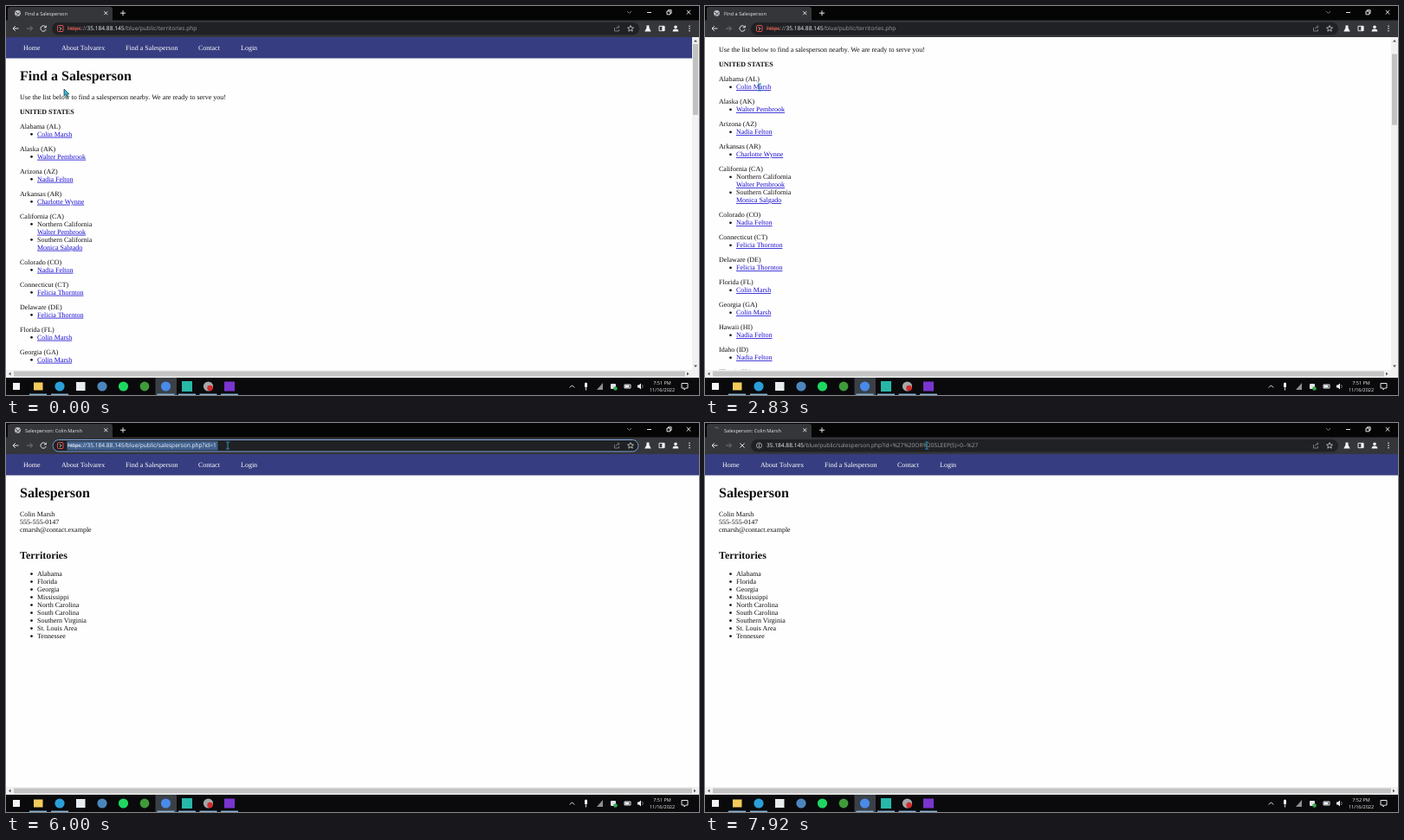
These frames come from a looping animation (800 px wide and 450 px high, 8000 ms). An HTML page:

```html
<!DOCTYPE html>
<html lang="en">
<head>
<meta charset="utf-8">
<title>Find a Salesperson</title>
<style>
  html, body { margin: 0; width: 100%; height: 100%; overflow: hidden; background: #fff; }
  svg { display: block; width: 800px; height: 450px; }
  text { font-family: "Open Sans", sans-serif; text-rendering: geometricPrecision; white-space: pre; }
  .page text { font-family: "Liberation Serif", "Times New Roman", serif; fill: #111; }
  .page .nav text { fill: #fff; }
  .page .link { fill: #1a0ed0; text-decoration: underline; }
  .b { font-weight: 700; }
  .line { fill: none; stroke: #e4e5e7; stroke-width: 1; }
  .dim { stroke: #77787b; }
  .scroll { animation: scroll 8s linear infinite; }
  .thumb { animation: thumb 8s linear infinite; }
  .pointer { animation: pointer 8s ease-in-out infinite; }
  .spin { animation: spin .8s linear infinite; transform-origin: 13px 8px; }
  @keyframes scroll {
    0%, 26.9% { transform: translateY(0); }
    28.125% { transform: translateY(-12px); }
    31.25%, 36.25% { transform: translateY(-54.5px); }
    39.5%, 100% { transform: translateY(0); }
  }
  @keyframes thumb {
    0%, 26.9% { transform: translateY(0); }
    28.125% { transform: translateY(2.5px); }
    31.25%, 36.25% { transform: translateY(11.6px); }
    39.5%, 100% { transform: translateY(0); }
  }
  @keyframes pointer {
    0%, 12% { transform: translate(67px, 96px); }
    26%, 28.5% { transform: translate(70px, 66px); }
    34%, 36.5% { transform: translate(63px, 94px); }
    41.5%, 54% { transform: translate(61px, 151px); }
    63%, 100% { transform: translate(256px, 26px); }
  }
  @keyframes spin { to { transform: rotate(360deg); } }
</style>
</head>
<body>
<script>
const LOOP = 8000;
const T = { hover: 3300, click: 3700, loaded: 4080, leave: 4450, focus: 5350, minute: 6350, edit: 6480, paste: 7150, enter: 7650 };
const rules = [];

// Shows the content only during the given [start, end] spans.
function during(spans, content) {
  const name = 'show' + rules.length;
  let steps = spans[0][0] ? '0%{opacity:0}' : '';
  for (const [start, end] of spans) {
    steps += `${start / LOOP * 100}%{opacity:1}`;
    if (end < LOOP) steps += `${end / LOOP * 100}%{opacity:0}`;
  }
  rules.push(`@keyframes ${name}{${steps}}`);
  return `<g style="animation:${name} ${LOOP}ms step-end infinite">${content}</g>`;
}

const text = (x, y, size, body, attrs = 'fill="#e8eaed"') => `<text x="${x}" y="${y}" font-size="${size}" ${attrs}>${body}</text>`;
const rect = (x, y, w, h, fill, rx = 0) => `<rect x="${x}" y="${y}" width="${w}" height="${h}" fill="${fill}" rx="${rx}"/>`;
const disc = (x, y, r, fill) => `<circle cx="${x}" cy="${y}" r="${r}" fill="${fill}"/>`;
const line = (d, cls = '') => `<path class="line ${cls}" d="${d}"/>`;
const span = (body, fill, cls = '') => `<tspan fill="${fill}" class="${cls}">${body}</tspan>`;
const globe = (x, y) => disc(x, y, 3.4, '#c4c7cb') +
  `<path d="M${x - 2.6} ${y - 1.2}l2 .8 .6 1.8-1.4 1M${x + 2.7} ${y - 1}l-1.7 1.2.6 1.6" fill="none" stroke="#45474b"/>`;

// Web pages
const nav = width => `<g class="nav">${rect(0, 36, width, 24.5, '#363d80')}` +
  [[20, 'Home'], [64, 'About Tolvarex'], [138, 'Find a Salesperson'], [222, 'Contact'], [271, 'Login']]
    .map(([x, label]) => text(x, 51, 8, label, '')).join('') + '</g>';
const heading = (y, size, body) => text(16, y, size, body, 'class="b"');
const bullet = y => disc(29.5, y - 2.4, 1.35, '#111');
const link = (y, body) => text(36, y, 8, body, 'class="link"');

const agents = { C: 'Colin Marsh', W: 'Walter Pembrook', N: 'Nadia Felton', E: 'Charlotte Wynne', M: 'Monica Salgado', F: 'Felicia Thornton' };
const states = [['Alabama (AL)', 'C'], ['Alaska (AK)', 'W'], ['Arizona (AZ)', 'N'], ['Arkansas (AR)', 'E'],
  ['California (CA)', 'W', 'M'], ['Colorado (CO)', 'N'], ['Connecticut (CT)', 'F'], ['Delaware (DE)', 'F'],
  ['Florida (FL)', 'C'], ['Georgia (GA)', 'C'], ['Hawaii (HI)', 'N'], ['Idaho (ID)', 'N'], ['Illinois (IL)']];

function stateList() {
  let y = 141.7, out = '';
  for (const [state, ...keys] of states) {
    out += text(16, y, 8, state, '');
    keys.forEach((key, i) => {
      y += 9;
      out += bullet(y);
      if (keys.length > 1) {
        out += text(36, y, 8, ['Northern', 'Southern'][i] + ' California', '');
        y += 9;
      }
      out += link(y, agents[key]);
    });
    y += 17;
  }
  return out;
}

const hscroll = right => rect(0, 421, 800, 9, '#f1f1f1') + rect(9, 422.5, right - 17, 6, '#c4c4c4') +
  `<path d="M5.5 423.5v4l-2.5-2zM${right - 6} 423.5v4l2.5-2z" fill="#555"/>`;
const listPage = `<g class="page">${rect(0, 36, 800, 394, '#fefefe')}<g class="scroll">${nav(792)}` +
  heading(85.5, 16, 'Find a Salesperson') +
  text(16, 107.6, 8, 'Use the list below to find a salesperson nearby. We are ready to serve you!', '') +
  heading(124.6, 8, 'UNITED STATES') + stateList() + '</g></g>' +
  rect(792, 36, 8, 394, '#f1f1f1') + `<g class="thumb">${rect(793, 44, 6, 82, '#c1c1c1')}</g>` +
  '<path d="M794 41.5h4l-2-2.5zM794 415.5h4l-2 2.5z" fill="#555"/>' + hscroll(792);

const territories = ['Alabama', 'Florida', 'Georgia', 'Mississippi', 'North Carolina', 'South Carolina', 'Southern Virginia', 'St. Louis Area', 'Tennessee'];
const personPage = `<g class="page">${rect(0, 36, 800, 394, '#fefefe')}${nav(800)}` + heading(85.5, 16, 'Salesperson') +
  [agents.C, '555-555-0147', 'cmarsh@contact.example'].map((row, i) => text(16, 107.6 + 9 * i, 8, row, '')).join('') +
  heading(157, 12, 'Territories') +
  territories.map((name, i) => bullet(177 + 9 * i) + text(36, 177 + 9 * i, 8, name, '')).join('') + '</g>' + hscroll(800);

// Browser frame
const host = '35.184.88.145', gray = '#9aa0a6', white = '#f1f3f4', blue = '#5b8ff0';
const personPath = '/blue/public/salesperson.php?id=';
const personUrl = `https://${host}${personPath}`;
const injection = "' OR SLEEP(5)=0--'";
const urlText = (x, body) => text(x, 28.4, 6.6, body);
const badge = '<rect x="59.5" y="22.5" width="6.5" height="7" rx="1" fill="none" stroke="#e0524c"/><path d="M61.5 24.5l2.5 1.5-2 2" fill="none" stroke="#f0c8c6" stroke-width=".8"/>';
const unsafeUrl = path => badge + urlText(71, span('https', '#e5645c') + span('://', gray) + span(host, white) + span(path, gray)) +
  rect(71, 25.8, 14.8, .8, '#e5645c');
const selectedUrl = badge + rect(70.5, 21, 174, 10.5, '#41618e') + urlText(71, span(personUrl + '1', '#f4f6fa')) + rect(71, 25.8, 14.8, .8, '#d6deea');
const infoUrl = '<circle cx="62.5" cy="26" r="3" fill="none" stroke="#c4c7cb" stroke-width=".8"/>' + rect(62.1, 25.5, .9, 2.3, '#c4c7cb') + rect(62.1, 24.1, .9, .9, '#c4c7cb') +
  urlText(71, span(host, white) + span(personPath + '%27%20OR%20SLEEP(5)=0--%27', gray));
const ring = '<rect x="54" y="19.5" width="676" height="13.5" rx="6.7" fill="none" stroke="#7fa6df"/>';

const loading = [[T.click, T.loaded], [T.enter, LOOP]];
const idle = [[0, T.click], [T.loaded, T.enter]];
const frame = rect(0, 0, 800, 17, '#050506') + '<path d="M2 17V4q0-3 3-3h115q3 0 3 3v13z" fill="#35363a"/>' +
  rect(0, 16.5, 800, 19.5, '#35363a') + rect(53, 19, 678, 14.5, '#202124', 7.2) +
  line('M113.3 6.2l4 4m0-4l-4 4M132 8.2h6m-3-3v6') +
  line('M717 6l2.5 2.5 2.5-2.5', 'dim') + line('M740 7.5h5M785.7 5l4.6 4.6m0-4.6l-4.6 4.6M763 6h3.8v3.8H763zM764.5 6V4.7h3.6v3.7h-1.3') +
  line('M24 26h6.5m-2.8-2.8L30.5 26l-2.8 2.8', 'dim') +
  line('M702.5 25v4h5v-2M704.5 26.5q0-2.5 3.5-2.5m-1.5-1.6l1.7 1.6-1.7 1.6', 'dim') +
  '<path d="M721 22.6l1 2.3 2.5.2-1.9 1.6.6 2.5-2.2-1.4-2.2 1.4.6-2.5-1.9-1.6 2.5-.2z" fill="none" stroke="#d0d2d5" stroke-width=".8"/>' +
  '<path d="M739.5 22.5h3v2.7l2.2 4.2h-7.4l2.2-4.2z" fill="#f1f3f4"/>' +
  line('M754 23.3h6v5.4h-6z') + rect(757.3, 23.3, 3, 5.4, white) +
  disc(773, 24.3, 1.8, white) + '<path d="M769.6 29.5q0-3 3.4-3t3.4 3z" fill="#f1f3f4"/>' +
  [23.3, 26, 28.7].map(y => disc(789, y, .8, white)).join('') +
  during(idle, globe(13.5, 8.3) + line('M45.8 24.2a3.2 3.2 0 1 0 .4 2.8M46.3 22.6v2.3h-2.4')) +
  during(loading, '<path class="line dim spin" d="M13 5a3 3 0 0 1 3 3"/>' + line('M40.4 23.4l5.2 5.2m0-5.2l-5.2 5.2')) +
  during([[0, T.click], [T.loaded, LOOP]], line('M14.5 26H8m2.8-2.8L8 26l2.8 2.8')) +
  during([[T.click, T.loaded]], line('M14.5 26H8m2.8-2.8L8 26l2.8 2.8', 'dim')) +
  during([[0, T.loaded]], text(22, 10.5, 5.6, 'Find a Salesperson') + unsafeUrl('/blue/public/territories.php')) +
  during([[T.loaded, LOOP]], text(22, 10.5, 5.6, `Salesperson: ${agents.C}`)) +
  during([[T.loaded, T.focus]], unsafeUrl(personPath + '1')) +
  during([[T.focus, T.edit]], selectedUrl + ring) +
  during([[T.enter, LOOP]], infoUrl);

// Address suggestions
const boldUrl = tail => span(personUrl.slice(0, -1), blue, 'b') + span('=' + tail, blue);
const row = (i, body) => text(77, 46.7 + 19 * i, 6.6, body);
const search = query => line('M66 65.7l-2-2', '') + '<circle cx="62.4" cy="62.3" r="2.1" class="line"/>' +
  row(1, span(query, white) + span(' - Plovix Search', gray));
const panel = bottom => `<rect x="51" y="17" width="682" height="${bottom - 17}" rx="3" fill="#202124" style="filter:drop-shadow(0 2px 3px #0008)"/>` +
  rect(51, 35.5, 682, 18.5, '#393a3e') + rect(51, 35.5, 1.3, 18.5, '#8ab4f8') + globe(63, 26) + globe(63, 44.5);
const typed = tail => urlText(77, span('https://', gray) + span(host, white) + span(personPath + tail, gray));
const suggestions =
  during([[T.edit, T.paste]], panel(115) + typed('') + rect(246, 22, .8, 8.5, white) +
    row(0, boldUrl('')) + search(personUrl) + globe(63, 82.5) + globe(63, 101.5) +
    row(2, span('Find a ', white) + span('Salesperson', white, 'b') + span(' - ', gray) + boldUrl('10')) +
    row(3, span('Salesperson:', white, 'b') + span(` ${agents.C}`, white) + span(' - ', gray) + boldUrl('1'))) +
  during([[T.paste, T.enter]], panel(77) + typed(injection) + row(0, boldUrl(injection)) + search(personUrl + injection));

const status = during([[T.hover, T.leave]], rect(-3, 419.5, 157, 11, '#202124', 2) + text(2, 427.2, 5.7, personUrl + '1'));

// Taskbar
const center = 'fill="#f1f1f1" text-anchor="middle"';
const taskbar = rect(0, 430, 800, 20, '#0a0a0c') + rect(172.5, 430, 24.5, 20, '#3a4046') +
  rect(8, 436, 8, 8, '#f4f4f4') + rect(32, 435.5, 10.5, 9, '#f3cb5b') + disc(62, 440, 5.6, '#2b9fd9') +
  rect(81, 435, 10.5, 10, '#e9edf0') + disc(111, 440, 5.6, '#4c86bd') + disc(135.5, 440, 5.6, '#1ed760') +
  disc(160, 440, 5.4, '#3f9b3a') + disc(184.5, 440, 5.6, '#4a8ae8') + rect(203, 434, 12, 12, '#27b8a8') +
  disc(233.5, 440, 5.6, '#a5a7aa') + disc(235.5, 442, 3.2, '#d42a2a') + rect(252, 434.5, 12, 11, '#7a35cf') +
  [37, 62, 184.5, 209, 233.5, 258].map(x => rect(x - 10, 448.6, 20, 1.4, '#86b5da')).join('') +
  line('M650.8 441.5l2.7-2.7 2.7 2.7') + rect(668, 435.5, 3, 6, white, 1.5) + line('M669.5 442v2.5') +
  '<path d="M682 444l7-8v8z" fill="#8d8f92"/>' + rect(698, 437, 6, 6, '#dfe2e4', 1) + disc(703.5, 442.5, 2.3, '#39a852') +
  line('M714 438h7v4h-7z') + rect(714.5, 438.5, 5, 3, white) +
  '<path d="M729 438.5h1.7l2.3-2v7l-2.3-2H729z" fill="#f1f3f4"/>' + line('M734.5 438q1.5 2 0 4', 'dim') +
  line('M780 436.5h7v5.5h-2.5l-1.5 2v-2h-3z') +
  during([[0, T.minute]], text(757.5, 437.8, 5.5, '7:51 PM', center)) +
  during([[T.minute, LOOP]], text(757.5, 437.8, 5.5, '7:52 PM', center)) +
  text(757.5, 446.2, 5.5, '11/16/2022', center);

// Mouse pointer
const teal = 'fill="#35b4cf" stroke="#12394a" stroke-width=".7"';
const pointer = '<g class="pointer">' +
  during([[0, 1900], [T.leave, 4920]], `<path d="M0 0v8l1.9-1.6 1.4 3 1.5-.7-1.4-2.8h2.5z" ${teal}/>`) +
  during([[1900, 3250], [4920, LOOP]], '<path d="M-2-4h1.3q.7 0 .7.7v6.6q0 .7-.7.7H-2M2-4H.7Q0-4 0-3.3v6.6Q0 4 .7 4H2" fill="none" stroke="#2c87a8" stroke-width="1.2"/>') +
  during([[3250, T.leave]], `<path d="M-1.2 0q.8-.9 1.5 0v3l3 .7q1 .3.9 1.5l-.6 4H-.6l-2.2-3.6q.3-1 1.6 0z" ${teal}/>`) + '</g>';

document.body.innerHTML = '<svg viewBox="0 0 800 450">' + during([[0, T.loaded]], listPage) + during([[T.loaded, LOOP]], personPage) +
  frame + suggestions + taskbar + status + pointer + '</svg>';
document.head.appendChild(document.createElement('style')).textContent = rules.join('\n');
</script>
</body>
</html>
```
